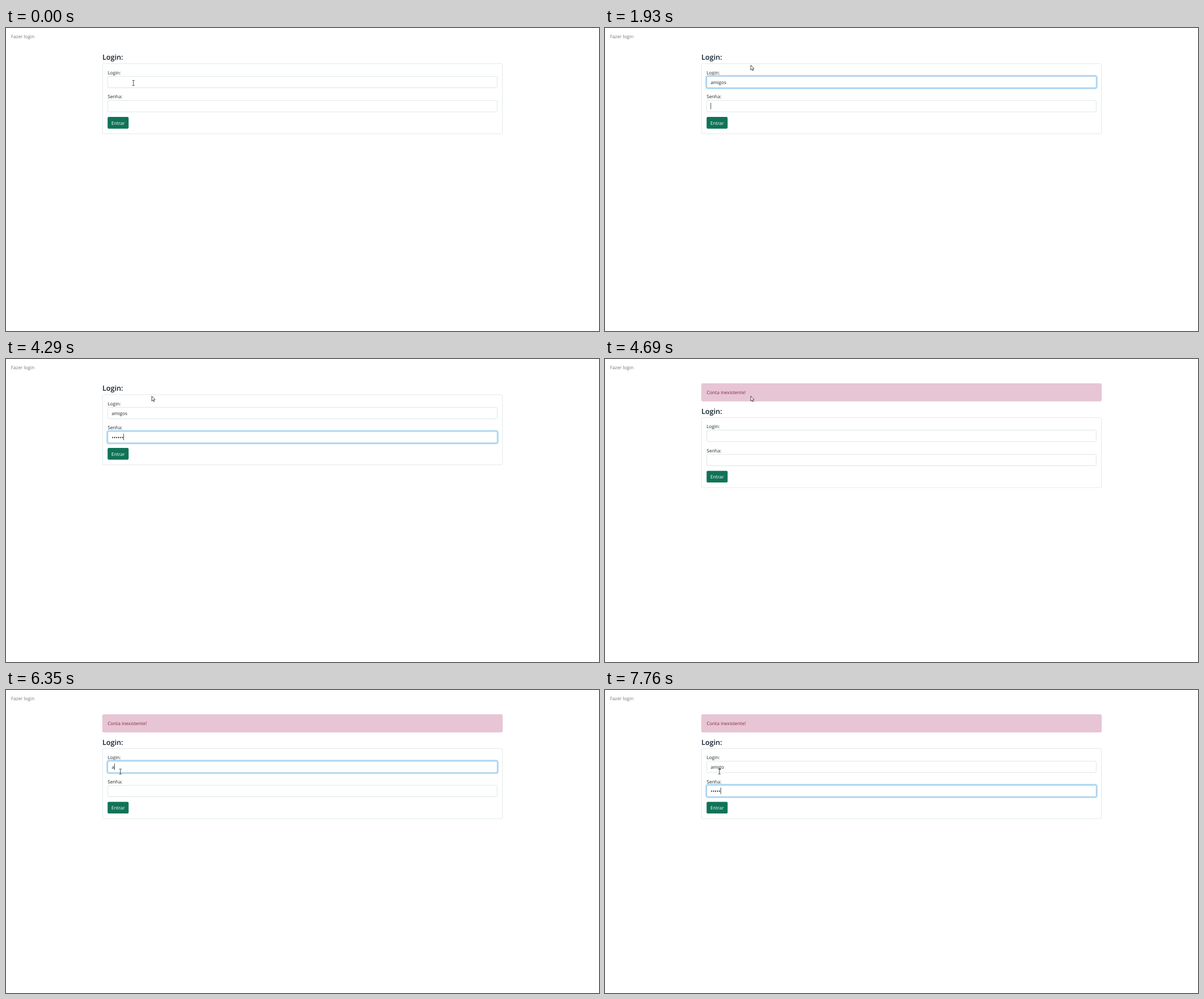
Write an HTML page that moves like this. It is 1047x535 px and loops after 8000 ms.

```html
<!DOCTYPE html>
<html lang="pt">
<head>
<meta charset="utf-8">
<title>Login</title>
<style>
  html, body { margin: 0; width: 100%; height: 100%; overflow: hidden; background: #fff; }
  svg { display: block; width: 1047px; height: 535px; }
  text { font: 15.1px "Open Sans", "Noto Sans", sans-serif; fill: #212529; text-rendering: geometricPrecision; white-space: pre; }
  .nav { fill: #737373; }
  .title { font-size: 23.1px; font-weight: 600; fill: #0d1b2a; }
  .alert { fill: #842c3c; }
  .mask { font-size: 17px; }
  .button { fill: #0f7357; }
  .button-label { fill: #fff; text-anchor: middle; }
  .card { fill: #fff; stroke: #c6d8d6; }
  .box { fill: #fff; stroke: #bdd3d2; }
  .ring { fill: none; stroke: #b4dcf6; stroke-width: 4; }
  .edge { fill: none; stroke: #6cb2ea; }
  .arrow { fill: #fff; stroke: #222; stroke-width: .8; }
  .beam { fill: none; stroke: #333; stroke-width: .9; }
</style>
</head>
<body>
<svg viewBox="0 0 1047 535">
  <!-- Page laid out 1920 units wide -->
  <g transform="scale(.5453)">
    <text class="nav" x="16" y="33.5">Fazer login</text>
    <g id="alert">
      <rect x="312.5" y="79.5" width="1295" height="57" rx="4" fill="#e7c5d5" stroke="#dfb5c3"/>
      <text class="alert" x="329" y="114">Conta inexistente!</text>
    </g>
    <g id="form">
      <text class="title" x="312" y="103">Login:</text>
      <rect class="card" x="312.5" y="115.5" width="1295" height="227" rx="4"/>
      <text x="329" y="150">Login:</text>
      <text x="329" y="228">Senha:</text>
      <rect class="button" x="329" y="288" width="68" height="38" rx="4"/>
      <text class="button-label" x="363" y="313">Entrar</text>
    </g>
  </g>
  <path id="arrow" class="arrow" d="M.4 .5V9.3L2.4 7.4L3.8 10.4L5 9.8L3.7 6.9H6.3Z"/>
  <path id="beam" class="beam" d="M-2-4.5H-.6L0-4L.6-4.5H2M0-4V4M-2 4.5H-.6L0 4L.6 4.5H2"/>
</svg>
<script>
const LOOP = 8000, RELOAD = 4690, BLINK = 530;
const $ = id => document.getElementById(id);
const dots = n => "•".repeat(n);

// Each visit to a field: focus span, glow steps, and the times of its keys.
const visits = [
  { field: 0, from: 190, to: 1930, wake: 150, fade: [260, 330], text: "amigos", keys: [1080, 1280, 1340, 1540, 1630, 1730] },
  { field: 1, from: 1930, to: RELOAD, wake: 1920, fade: [1990, 2050], text: dots(6), keys: [2540, 2640, 2840, 2970, 3100, 3230] },
  { field: 0, from: 5840, to: 7000, wake: 5840, fade: [5960, 6020], text: "amigo", keys: [6350, 6450, 6540, 6740, 6870] },
  { field: 1, from: 7000, to: LOOP, wake: 7000, fade: [7060, 7130], text: dots(5), keys: [7230, 7300, 7500, 7630, 7760] }
];

// Pointer stops: time, x, y
const pointer = [
  [0, 225, 97], [400, 229, 93], [470, 237, 84], [540, 246, 74], [610, 253, 68], [680, 257, 65],
  [5090, 250, 66], [5150, 234, 67], [5210, 212, 67], [5270, 194, 67], [5330, 187, 67],
  [5530, 188, 76], [5600, 192, 98], [5680, 198, 126], [5760, 202, 144]
];

const passed = (times, t) => times.filter(time => time <= t).length;

function add(name, attributes) {
  const node = document.createElementNS("http://www.w3.org/2000/svg", name);
  for (const key in attributes) node.setAttribute(key, attributes[key]);
  return $("form").appendChild(node);
}

function makeField(index) {
  const top = 156 + 78 * index;
  const frame = (cls, inset, rx) => add("rect", {
    class: cls, x: 329 + inset, y: top + inset, width: 1262 - 2 * inset, height: 38 - 2 * inset, rx
  });
  frame("box", .5, 4);
  return {
    glow: [frame("ring", -2, 6), frame("edge", .5, 4)],
    text: add("text", { class: index ? "mask" : "", x: 342, y: top + 25 + index }),
    caret: add("rect", { y: top + 8, width: 1.3, height: 21 })
  };
}
const fields = [makeField(0), makeField(1)];

function drawField(field, visit, nextVisit, t) {
  const active = t >= visit.from && t < visit.to;
  const leaving = nextVisit ? passed(nextVisit.fade, t) / 2 : 0;
  const glow = passed(visit.fade, t) / 2 - leaving;
  field.glow.forEach(node => node.setAttribute("opacity", glow));

  const count = passed(visit.keys, t);
  field.text.textContent = visit.text.slice(0, count);
  const lastKey = count ? visit.keys[count - 1] : visit.wake;
  const lit = active && (t - lastKey) % (2 * BLINK) < BLINK;
  field.caret.setAttribute("x", 342 + (count ? field.text.getComputedTextLength() : 0));
  field.caret.setAttribute("opacity", lit ? 1 : 0);
}

function draw(t) {
  const failed = t >= RELOAD;
  $("alert").style.display = failed ? "" : "none";
  $("form").setAttribute("transform", `translate(0 ${failed ? 74 : 0})`);

  const [login, password] = visits.slice(failed ? 2 : 0, failed ? 4 : 2);
  drawField(fields[login.field], login, password, t);
  drawField(fields[password.field], password, null, t);

  const [, x, y] = pointer[passed(pointer.map(stop => stop[0]), t) - 1];
  const top = failed ? 125.5 : 85;
  const overField = y > top && y < top + 21;
  for (const id of ["arrow", "beam"]) {
    $(id).setAttribute("transform", `translate(${x} ${y})`);
    $(id).style.display = overField === (id === "beam") ? "" : "none";
  }
}

const start = performance.now();
function tick() {
  draw((performance.now() - start) % LOOP);
  requestAnimationFrame(tick);
}
tick();
</script>
</body>
</html>
```
